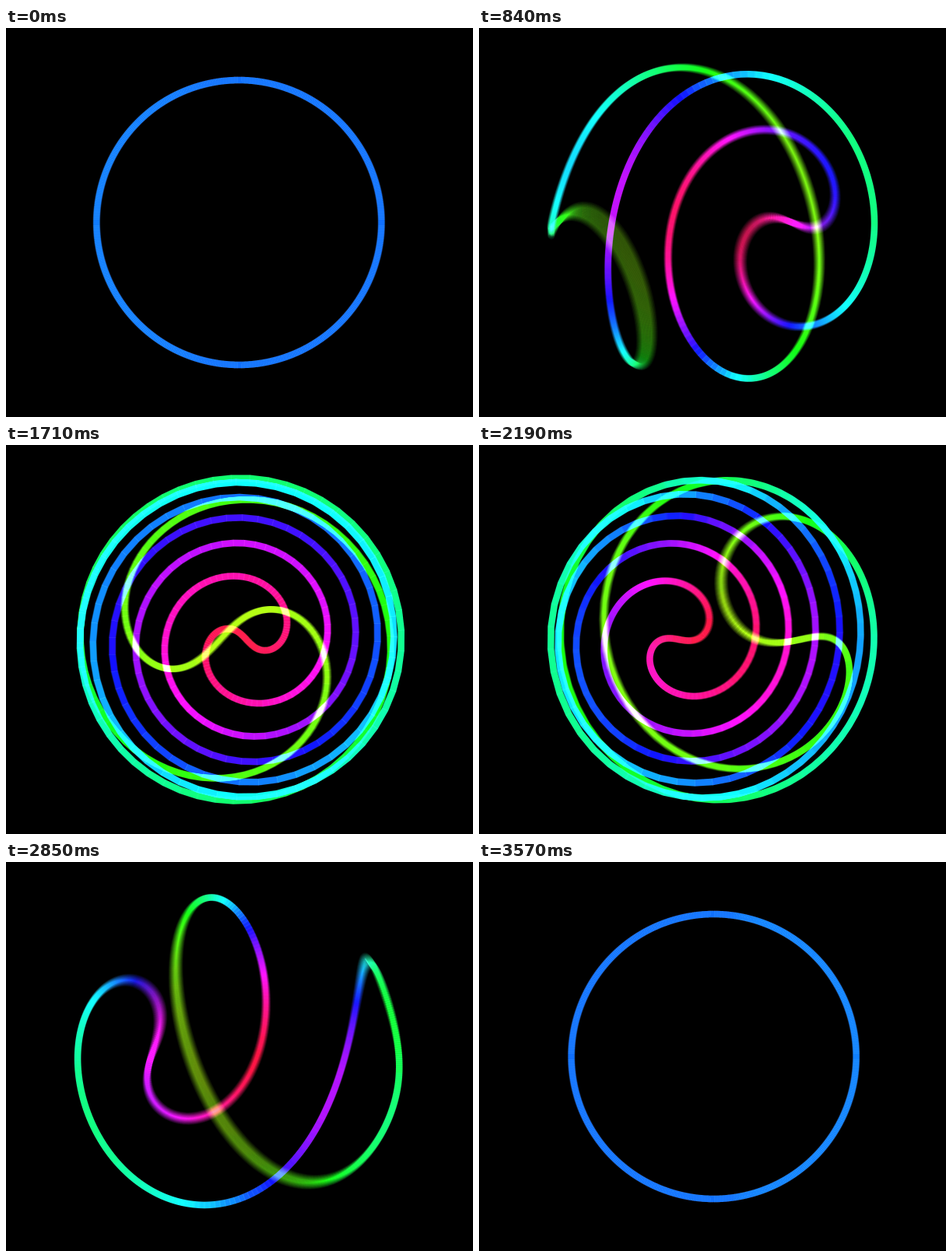
An HTML page with a canvas for the animation above (3600 ms loop, 600 px wide and 500 px high).

```html
<!DOCTYPE html>
<html lang="en">
<head>
<meta charset="utf-8">
<title>Twisting loop</title>
<style>
  html, body { margin: 0; width: 100%; height: 100%; overflow: hidden; background: #000; }
  canvas { display: block; width: 600px; height: 500px; }
</style>
</head>
<body>
<canvas id="stage" width="600" height="500"></canvas>
<script>
const ctx = document.getElementById('stage').getContext('2d');
const STEP = 30, STEPS = 120;          // ms per picture, pictures per loop
const SHUTTER = 0.6, SAMPLES = 16;     // motion blur
const POINTS = 560, HALF = 4.25;       // curve resolution, half line width
const RADIUS = 183, CAMERA = 2.1, TWIST = 11.83;

function ease(u, p) {
  return u < 0.5 ? 0.5 * (2 * u) ** p : 1 - 0.5 * (2 - 2 * u) ** p;
}

// A great circle turning about the vertical axis, twisted along its own diameter.
function curve(t) {
  const turn = Math.PI * t;
  const vx = Math.cos(turn), vz = -Math.sin(turn);
  const twist = TWIST * ease(1 - Math.abs(2 * t - 1), 2.7);
  const pts = [];
  for (let i = 0; i < POINTS; i++) {
    const a = 2 * Math.PI * i / POINTS;
    const c = Math.cos(a), s = Math.sin(a);
    const up = s * Math.cos(twist * c), side = s * Math.sin(twist * c);
    const x = c * vx - side * vz;
    const z = c * vz + side * vx;
    const k = RADIUS * CAMERA / (CAMERA - z);
    pts.push({ x: 300 + k * x, y: 250 - k * up, z });
  }
  return pts;
}

function drawCurve(pts) {
  const at = i => pts[(i + POINTS) % POINTS];
  pts.forEach((p, i) => {
    const a = at(i - 1), b = at(i + 1);
    const dx = b.x - a.x, dy = b.y - a.y;
    const k = HALF / (Math.hypot(dx, dy) || 1);
    p.nx = -dy * k;
    p.ny = dx * k;
  });
  pts.forEach((p, i) => {
    const q = at(i + 1);
    ctx.fillStyle = `hsl(${215 - 67.5 * (p.z + q.z)}, 100%, 54%)`;
    ctx.beginPath();
    ctx.moveTo(p.x + p.nx, p.y + p.ny);
    ctx.lineTo(q.x + q.nx, q.y + q.ny);
    ctx.lineTo(q.x - q.nx, q.y - q.ny);
    ctx.lineTo(p.x - p.nx, p.y - p.ny);
    ctx.fill();
  });
}

function draw(step) {
  ctx.globalCompositeOperation = 'source-over';
  ctx.globalAlpha = 1;
  ctx.fillStyle = '#000';
  ctx.fillRect(0, 0, 600, 500);
  ctx.globalCompositeOperation = 'lighter';
  ctx.globalAlpha = 1 / SAMPLES;
  for (let i = 0; i < SAMPLES; i++) {
    drawCurve(curve((step + SHUTTER * i / SAMPLES) / STEPS));
  }
}

const start = performance.now();
let shown = -1;
function tick() {
  const step = Math.floor((performance.now() - start) / STEP) % STEPS;
  if (step !== shown) draw(shown = step);
  requestAnimationFrame(tick);
}
tick();
</script>
</body>
</html>
```
